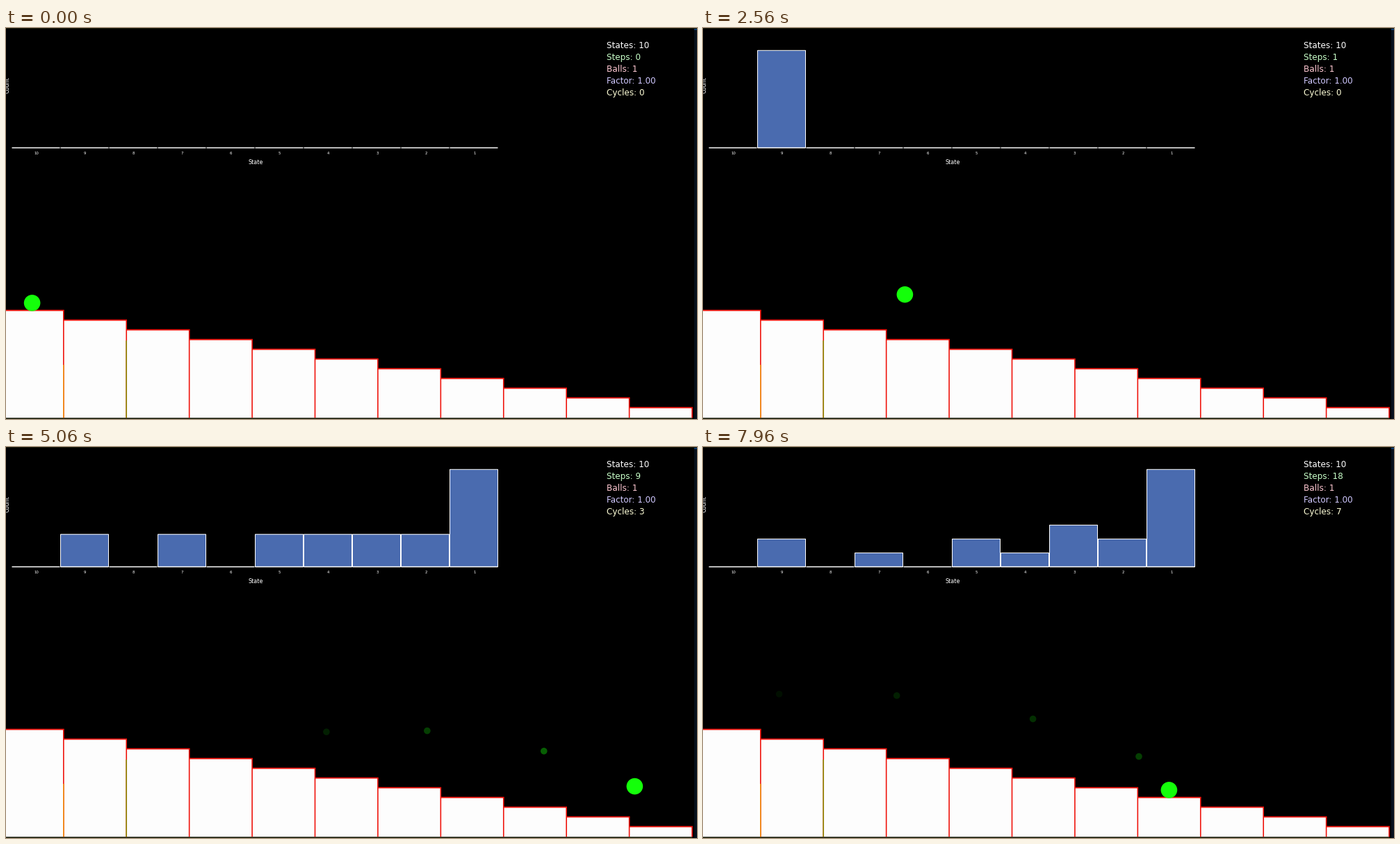
Write a matplotlib script that moves like this. It is 994 px wide and 563 px high and loops after 7990 ms.

```python
import matplotlib.pyplot as plt
from matplotlib.animation import FuncAnimation
from matplotlib.patches import Circle, Rectangle

W, H, DPI = 994, 563, 100
PX = 72 / DPI
FRAMES, INTERVAL = 235, 34
STATES = 10
RED, GREEN, BLUE = "#f01008", "#14ff0a", "#4a6baf"

# states visited in each cycle; every cycle starts on the top stair
CYCLES = [[9, 2, 1], [5, 1], [4, 3, 1], [7, 1], [9, 5, 1], [3, 1], [3, 2, 1], [4]]
FIRST = 65
GAPS = [9, 8, 8, 8, 9, 9, 9, 9, 10, 10, 10, 10, 9, 9, 9, 9, 8, 8]
RATE, ARC = 0.21, 77.3

plt.rcParams["font.family"] = "DejaVu Sans"
fig = plt.figure(figsize=(W / DPI, H / DPI), dpi=DPI, facecolor="black")
ax = fig.add_axes([0, 0, 1, 1])
ax.set_xlim(0, W)
ax.set_ylim(H, 0)
ax.axis("off")


def rect(x, y, w, h, **style):
    return ax.add_patch(Rectangle((x, y), w, h, snap=False, **style))


def line(x0, y0, x1, y1, color, width, z=3):
    ax.plot([x0, x1], [y0, y1], color=color, lw=width * PX, zorder=z,
            solid_capstyle="butt", snap=False)


def label(x, y, text, size, color="white", **style):
    return ax.text(x, y, text, fontsize=size * PX, color=color, **style)


def rest(stair):
    return 37.6 + 90.4 * stair, 395.9 + 14 * stair


def build_hops():
    """List (launch frame, from stair, to stair, finished cycles) per hop."""
    hops, start = [], FIRST
    for done, cycle in enumerate(CYCLES):
        stair = 0
        for state in cycle:
            target = STATES + 1 - state
            hops.append((start, stair, target, done))
            if len(hops) <= len(GAPS):
                start += GAPS[len(hops) - 1]
            stair = target
    return hops


HOPS = build_hops()


def position(hop, k):
    # short hops fly a little faster
    rate = RATE + 0.01 * max(0, 6 - (hop[2] - hop[1]))
    t = min(1, RATE + rate * (k - 1)) if k else 0
    s = t * t * (3 - 2 * t)
    (x0, y0), (x1, y1) = rest(hop[1]), rest(hop[2])
    return x0 + (x1 - x0) * s, y0 + (y1 - y0) * s - 4 * ARC * t * (1 - t)


# frame of the stage
rect(990, 0, 4, H, fc="#06101c", ec="none")
rect(990, 0, 4, 3, fc="#0a3a70", ec="none")
line(0, 0.5, W, 0.5, "#1e1e0c", 1)

# stairs
for i in range(STATES + 1):
    left, top = -7.6 + 90.42 * i, 406.6 + 14 * i
    right = left + 90.42
    rect(left, top, right - left, 561.5 - top, fc="#fdfdfd", ec="none")
    line(left, top, right + 0.8, top, RED, 1.8)
    line(right, top, right, 561.5, RED, 1.6)
line(82.8, 485, 82.8, 561.5, "#f09010", 1.6, 4)
line(173.2, 450, 173.2, 561.5, "#8c8c08", 1.6, 4)
line(0, 562.3, 987, 562.3, "#20240c", 1.4, 4)

# histogram
BASE, TALL = 172.5, 140.2
bars = []
for i in range(STATES):
    bars.append(rect(8.5 + 70 * i, BASE, 69, 0, fc=BLUE, ec="white",
                     lw=PX, zorder=2))
    line(8.5 + 70 * i, BASE, 77.5 + 70 * i, BASE, "white", 1.5)
    label(43.5 + 70.05 * i, 180.3, str(STATES - i), 5.4, ha="center",
          va="center_baseline")
label(359, 196, "State", 8, ha="center", va="baseline")
label(2, 82, "Count", 8, ha="center", va="center", rotation=90)

# counters
NAMES = ["States", "Steps", "Balls", "Factor", "Cycles"]
TINTS = ["white", "#c8ffc8", "#ffc8d2", "#d0c8ff", "#ffffd8"]
info = [label(864, 29 + 17.1 * i, "", 12, c, va="baseline")
        for i, c in enumerate(TINTS)]

dots = [ax.add_patch(Circle((0, 0), 4.8, fc=GREEN, ec="none", zorder=5))
        for _ in range(10)]
ball = ax.add_patch(Circle(rest(0), 11.8, fc=GREEN, ec="none", zorder=6))


def draw(n):
    started = [h for h in HOPS if h[0] <= n]
    steps = max(0, len(started) - 1)
    hop = started[-1] if started else HOPS[0]
    k = n - hop[0] if started else 0

    counts = [0] * STATES
    for _, _, target, _ in started[:-1]:
        counts[target - 1] += 1
    peak = max(max(counts), 1)
    for bar, count in zip(bars, counts):
        bar.set_y(BASE - TALL * count / peak)
        bar.set_height(TALL * count / peak)
        bar.set_visible(count > 0)

    values = [STATES, steps, 1, "1.00", hop[3]]
    for text, name, value in zip(info, NAMES, values):
        text.set_text(f"{name}: {value}")

    ball.center = position(hop, k)
    for i, dot in enumerate(dots, 1):
        dot.set_visible(i < k)
        if i < k:
            dot.center = position(hop, i)
            dot.set_alpha(0.5 * i / k)
    return [ball, *dots, *bars, *info]


anim = FuncAnimation(fig, draw, frames=FRAMES, interval=INTERVAL, repeat=True,
                     repeat_delay=0, init_func=lambda: draw(0), blit=False)
plt.show()
```
